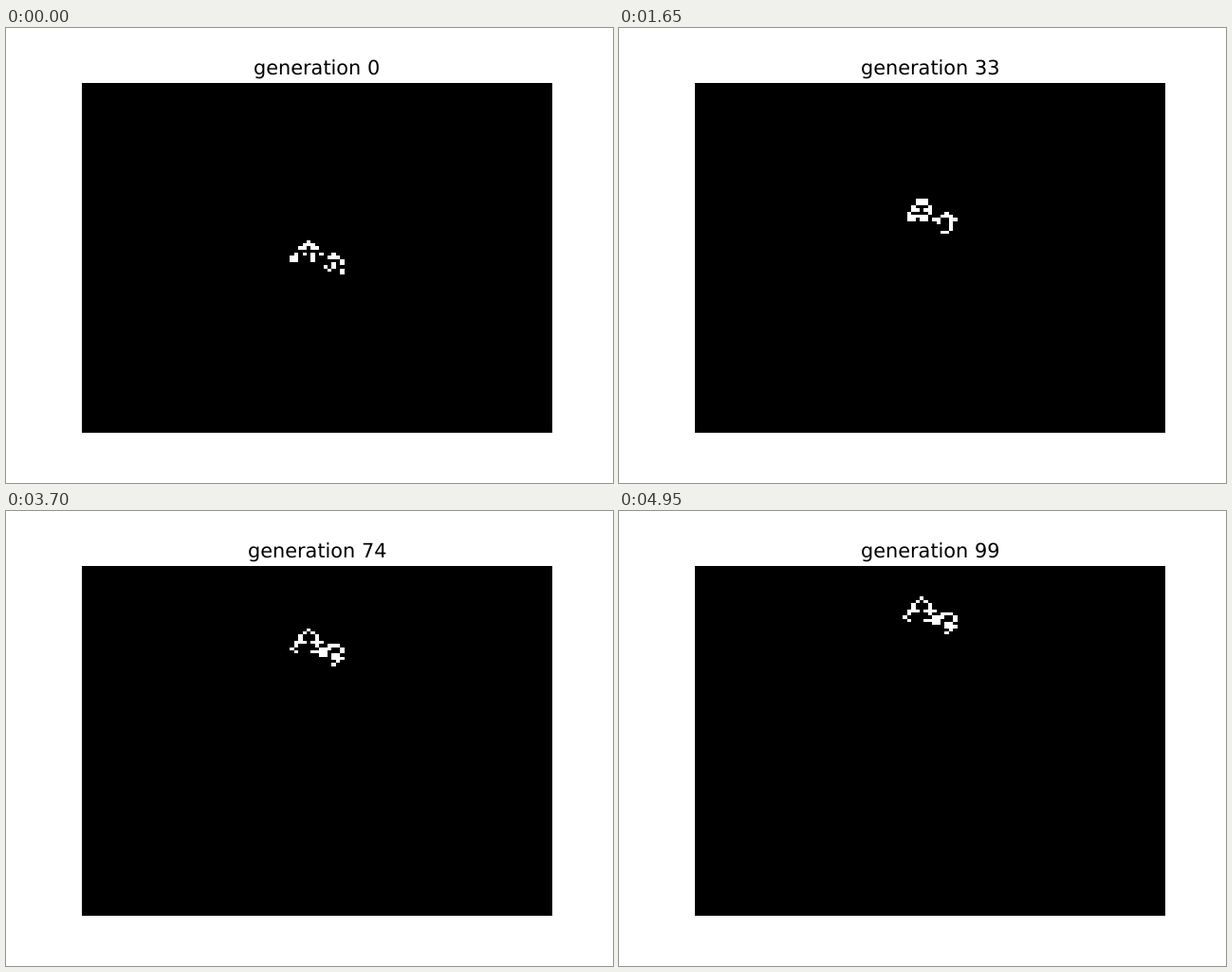
Recreate the animation shown at these times as an HTML page with a canvas. Size 640 by 480 pixels, loop 5 s.

```html
<!DOCTYPE html>
<html lang="en">
<head>
<meta charset="utf-8">
<title>Life spaceship</title>
<style>
  html, body { margin: 0; width: 100%; height: 100%; overflow: hidden; background: #fff; }
  canvas { display: block; }
</style>
</head>
<body>
<canvas id="stage" width="640" height="480"></canvas>
<script>
const ctx = document.getElementById('stage').getContext('2d');

const COLS = 113, ROWS = 111, PAD = 50;
const STEP_MS = 50, STEPS = 100;

const ship = [
  '....O',
  '...OOO',
  '..OO.OO',
  '',
  '.O.O.O.O..O',
  'OO...O...OOO',
  'OO...O......O',
  '..........O.O',
  '........O.O',
  '.........O..O',
  '............O',
];

const isAlive = (grid, row, col) => grid[row]?.[col] ?? 0;

function seedGrid() {
  const grid = Array.from({ length: ROWS }, () => new Uint8Array(COLS));
  ship.forEach((line, r) => [...line].forEach((ch, c) => {
    if (ch === 'O') grid[PAD + r][PAD + c] = 1;
  }));
  return grid;
}

function countNeighbours(grid, row, col) {
  let n = -isAlive(grid, row, col);
  for (let r = row - 1; r <= row + 1; r++)
    for (let c = col - 1; c <= col + 1; c++) n += isAlive(grid, r, c);
  return n;
}

function evolve(grid) {
  return grid.map((line, r) => line.map((cell, c) => {
    const n = countNeighbours(grid, r, c);
    return n === 3 || (cell && n === 2) ? 1 : 0;
  }));
}

const generations = [seedGrid()];
while (generations.length < STEPS) generations.push(evolve(generations.at(-1)));

// Cell edges snap to whole pixels.
const edgeX = col => 80 + Math.ceil(col * 496 / COLS - 0.5);
const edgeY = row => 57 + Math.ceil(row * 370 / ROWS - 0.5);

function drawTitle(text) {
  ctx.font = '20.8333px "DejaVu Sans", sans-serif';
  ctx.textRendering = 'geometricPrecision';
  ctx.fillStyle = '#000';
  ctx.fillText(text, Math.round(328 - ctx.measureText(text).width / 2), 49);
}

function draw(index) {
  ctx.fillStyle = '#fff';
  ctx.fillRect(0, 0, 640, 480);
  drawTitle(`generation ${index}`);
  ctx.fillRect(80, 58, 496, 369);
  ctx.fillStyle = '#fff';
  generations[index].forEach((line, r) => line.forEach((cell, c) => {
    if (!cell) return;
    const x = edgeX(c), y = edgeY(r);
    ctx.fillRect(x, y, edgeX(c + 1) - x, edgeY(r + 1) - y);
  }));
}

function tick() {
  draw(Math.floor(performance.now() / STEP_MS) % STEPS);
  requestAnimationFrame(tick);
}
tick();
</script>
</body>
</html>
```
